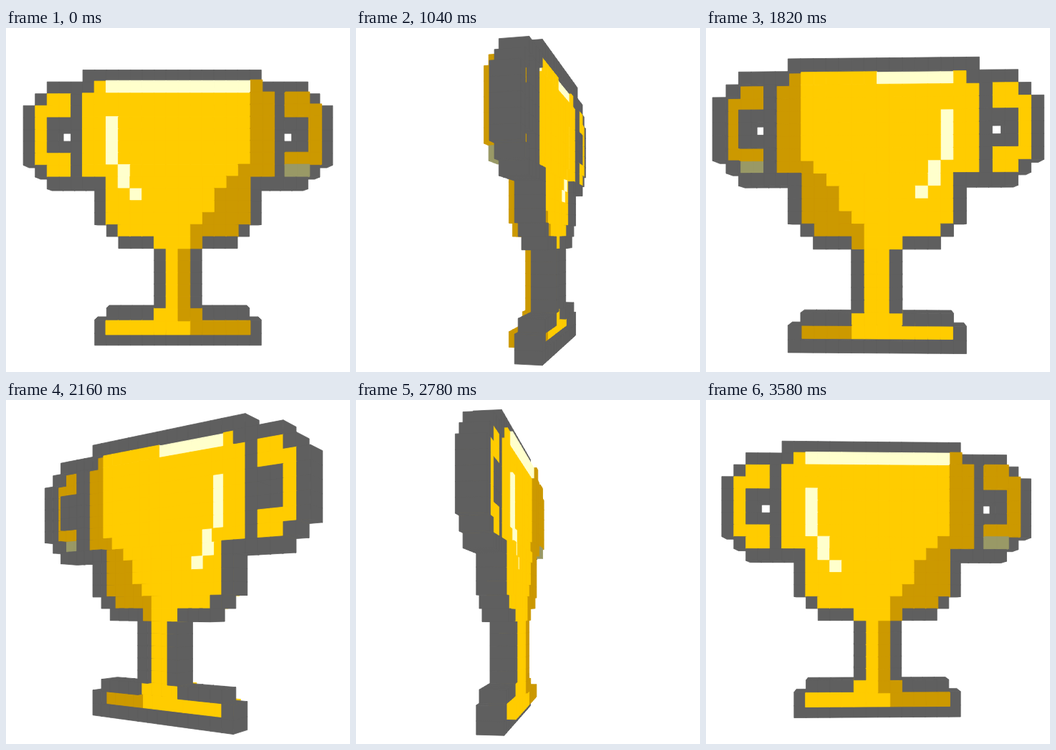
Animation of 480x480 px, one loop 3600 ms. Source, as an HTML page with a canvas:

```html
<!DOCTYPE html>
<html lang="en">
<head>
<meta charset="utf-8">
<title>Spinning trophy</title>
<style>
  html, body { margin: 0; width: 100%; height: 100%; overflow: hidden; background: #fff; }
  canvas { display: block; width: 480px; height: 480px; }
</style>
</head>
<body>
<canvas id="stage" width="480" height="480"></canvas>
<script>
const ctx = document.getElementById('stage').getContext('2d');

const LOOP = 3600, STEP = 20;
const DIST = 52, FOCAL = 876, CENTER_X = 240, HORIZON = 291;
const FRONT_Z = -0.75, BACK_Z = -2.8;
const GOLD = '#ffcc00', DARK = '#cc9900', SHINE = '#ffffcc', GRAY = '#5f5f5f', OLIVE = '#999966';

// Half widths per row, in cells; row 0 lies just below the horizon.
const TOP = -14, BASE = 7;
const RIM = [8, 11, 12, 13, 13, 13, 13, 13, 12, 11, 7, 7, 7, 6, 5, 2, 2, 2, 2, 2, 6, 7, 7];
const CUP = [0, 7, 8, 8, 8, 8, 8, 8, 8, 6, 6, 6, 6, 5, 2, 1, 1, 1, 1, 1, 2, 6, 0];
const SHADE = [9, 6, 6, 6, 6, 6, 6, 6, 5, 4, 3, 3, 2, 1, 1, 0, 0, 0, 0, 0, 0, 1, 9];

// Corner index: 1 = right, 2 = bottom, 4 = back.
const FACES = [
  [4, 5, 1, 0], [2, 3, 7, 6], [4, 0, 2, 6], [1, 5, 7, 3], [5, 4, 6, 7], [0, 1, 3, 2]
];
const BACK = 4;

const within = (v, a, b) => v >= a && v <= b;

function isHandle(a, y) {
  if (y === -12 || y === -6) return within(a, 9, 10);
  if (y === -11 || y === -7) return within(a, 9, 11);
  return within(y, -10, -8) && a === 11;
}

function isShine(x, y, fromBack) {
  if (y === -13) return within(x, -6, fromBack ? -1 : 5);
  return x === -6 && within(y, -10, -7) ||
         x === -5 && within(y, -6, -5) ||
         x === -4 && y === -4;
}

function goldColor(x, y, fromBack) {
  if (y === -6 && within(x, 9, 10)) return OLIVE;
  if (isShine(x, y, fromBack)) return SHINE;
  let start = SHADE[y - TOP];
  if (fromBack && y > 0) start = y === BASE ? 2 : 99;
  return x >= start ? DARK : GOLD;
}

// How far a face is pushed forward from the gray slab.
function lift(x, y, color) {
  if (color === GRAY) return 0;
  if (color === DARK || color === OLIVE || y === BASE) return 0.7;
  if (color === SHINE) return 0.45;
  if (y > -6) return 0.55;
  return x < -8 ? 0 : 0.25;
}

// The right handle sits slightly closer to the cup, and the base is a little taller.
const edgeX = x => within(x, 9, 12) ? x - 0.08 : x;
const edgeY = y => y > BASE ? y + 0.14 : y;

function makeCell(x, y, gold) {
  const front = gold ? goldColor(x, y, false) : GRAY;
  const back = gold ? goldColor(x, y, true) : GRAY;
  const zFront = FRONT_Z + lift(x, y, front);
  const zBack = BACK_Z + lift(x, y, back);
  const corners = [];
  for (let i = 0; i < 8; i++) {
    corners.push([edgeX(x + (i & 1)), edgeY(y + (i & 2) / 2), i & 4 ? zBack : zFront]);
  }
  return { x: x + 0.5, y: y + 0.5, corners, front, back };
}

const cells = [];
RIM.forEach((rim, row) => {
  const y = row + TOP;
  for (let x = -rim; x < rim; x++) {
    const a = x < 0 ? -x - 1 : x;
    if (y === TOP && x === 7) continue;
    if (y === -9 && a === 9) continue;
    cells.push(makeCell(x, y, a < CUP[row] || isHandle(a, y)));
  }
});

function drawFace(pts, color) {
  ctx.fillStyle = ctx.strokeStyle = color;
  ctx.beginPath();
  for (const [x, y] of pts) ctx.lineTo(x, y);
  ctx.closePath();
  ctx.fill();
  ctx.stroke();
}

function facesCamera([a, b, c, d]) {
  return (c[0] - a[0]) * (d[1] - b[1]) - (c[1] - a[1]) * (d[0] - b[0]) > 0;
}

function render(time) {
  const angle = time / LOOP * 2 * Math.PI;
  const cos = Math.cos(angle), sin = Math.sin(angle);
  const project = ([x, y, z]) => {
    const s = FOCAL / (DIST - x * sin - z * cos);
    return [CENTER_X + (x * cos - z * sin) * s, HORIZON + y * s];
  };

  ctx.fillStyle = '#fff';
  ctx.fillRect(0, 0, 480, 480);
  ctx.lineWidth = 0.8;
  ctx.lineJoin = 'round';

  // Far cells first, measured along the grid from the camera.
  const eyeX = DIST * sin;
  for (const cell of cells) cell.far = Math.abs(cell.x - eyeX) + Math.abs(cell.y);
  cells.sort((a, b) => b.far - a.far);

  for (const cell of cells) {
    const pts = cell.corners.map(project);
    FACES.forEach((face, i) => {
      const quad = face.map(k => pts[k]);
      if (facesCamera(quad)) drawFace(quad, i === BACK ? cell.back : cell.front);
    });
  }
}

function tick() {
  const t = performance.now() % LOOP;
  render(Math.floor(t / STEP) * STEP);
  requestAnimationFrame(tick);
}
tick();
</script>
</body>
</html>
```
